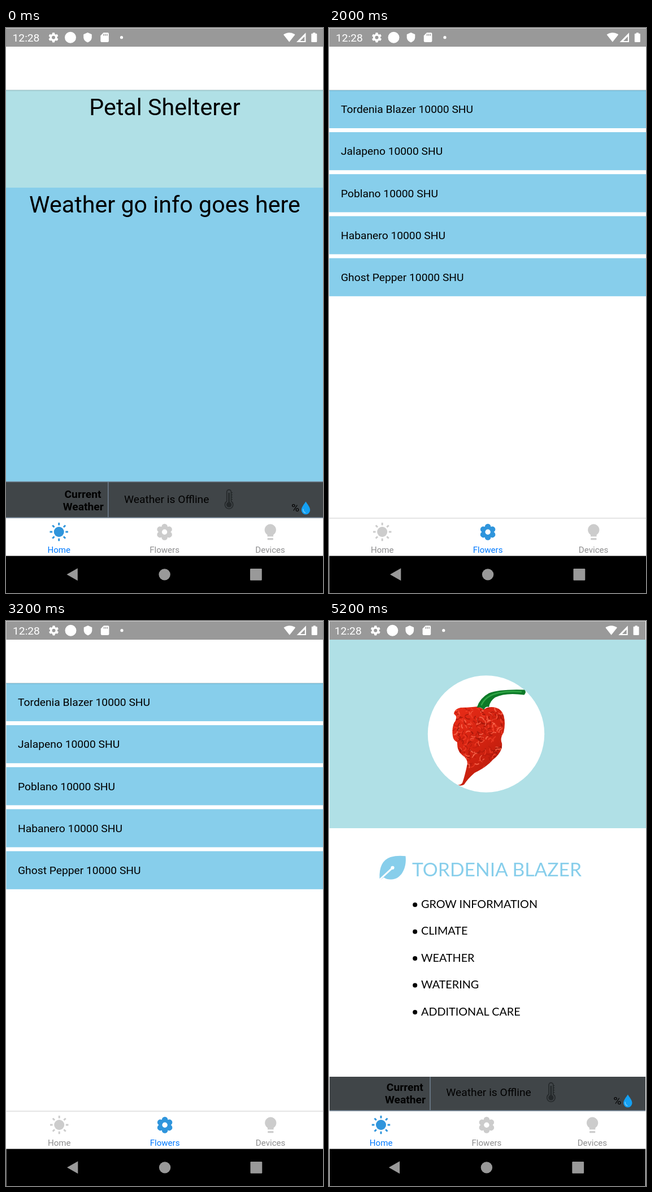
Recreate the animation shown at these times as an HTML page. Size 561x998 px, loop 6 s.

```html
<!DOCTYPE html>
<html lang="en">
<head>
<meta charset="utf-8">
<title>Garden app screens</title>
<style>
  html, body { margin: 0; width: 100%; height: 100%; overflow: hidden; background: #fff; }
  svg { display: block; width: 100vw; height: 100vh; }
  text { font-family: Roboto, sans-serif; white-space: pre; }
  .lato { font-family: Lato, sans-serif; }
</style>
</head>
<body>
<svg id="stage" viewBox="0 0 561 998" xmlns="http://www.w3.org/2000/svg"></svg>
<script>
const SKY = '#87ceeb', POWDER = '#b0e0e6', SLATE = '#708090', BAR = '#404548';
const ICON_ON = '#2f95dc', ICON_OFF = '#ccc', LABEL_ON = '#007aff', LABEL_OFF = '#8e8e8f';
const BODY = 19.25, TITLE = 41.2;

const rect = (x, y, w, h, fill, extra = '') =>
  `<rect x="${x}" y="${y}" width="${w}" height="${h}" fill="${fill}" ${extra}/>`;
const disc = (x, y, r, fill) => `<circle cx="${x}" cy="${y}" r="${r}" fill="${fill}"/>`;
const path = (d, fill, extra = '') => `<path d="${d}" fill="${fill}" ${extra}/>`;
const text = (x, y, size, str, fill = '#000', extra = '') =>
  `<text x="${x}" y="${y}" font-size="${size}" fill="${fill}" ${extra}>${str}</text>`;
const MID = 'text-anchor="middle"';
const shift = (dx, body) => `<g transform="translate(${dx} 0)">${body}</g>`;
const spin = (n, x, y, draw) => Array.from({ length: n }, (_, i) =>
  `<g transform="translate(${x} ${y}) rotate(${i * 360 / n})">${draw}</g>`).join('');

function statusIcons() {
  const w = '#fff';
  return text(11.5, 23.7, BODY, '12:28', w) +
    spin(6, 84, 16.8, rect(-2.2, -8.6, 4.4, 5, w, 'rx=".8"')) +
    `<circle cx="84" cy="16.8" r="4.8" fill="none" stroke="${w}" stroke-width="3.6"/>` +
    disc(114, 16.7, 10, w) +
    path('M144.5 8l7.3 3.2v5c0 4.3-3 7.8-7.3 9.2-4.3-1.4-7.3-4.9-7.3-9.2v-5z', w) +
    path('M172.500 8.300h7.600q1.800 0 1.800 1.800v13q0 1.800-1.800 1.800h-11q-1.800 0-1.800-1.800V13.400z', w) +
    [172.3, 175.2, 178.1].map(x => rect(x, 10.5, 1.5, 3.2, '#999')).join('') +
    disc(204.5, 16.7, 2.6, w) +
    path('M501.3 24.8L491 11.8Q495.5 8.2 501.3 8.2T511.6 11.8z', w) +
    path('M514 25L530.5 8.3V25zM520.5 22.9H528.3V15z', w, 'fill-rule="evenodd"') +
    path('M543.3 9.8V8.2h4V9.8h1.8q1.2 0 1.2 1.2V23.8q0 1.2-1.2 1.2h-7.6q-1.2 0-1.2-1.2V11q0-1.2 1.2-1.2z', w);
}

function sun(c) {
  return disc(93.7, 890, 9, c) + spin(8, 93.7, 890, rect(-1.5, -16.2, 3, 4.6, c));
}

function flower(c) {
  return spin(6, 280.6, 890.3, disc(0, -9.2, 5.3, c)) + disc(280.6, 890.3, 9.5, c) +
    disc(280.6, 890.3, 4.7, '#fff');
}

function bulb(c) {
  return path('M467.8 876.3a10.2 10.2 0 0 1 5.3 18.9V898.3h-10.6V895.2a10.2 10.2 0 0 1 5.3-18.9z', c) +
    rect(462.6, 901, 10.4, 3.2, c, 'rx="1.2"');
}

function tabs(active) {
  const items = [['Home', 93.8, sun], ['Flowers', 280.6, flower], ['Devices', 467.6, bulb]];
  return items.map(([name, x, icon], i) =>
    icon(i === active ? ICON_ON : ICON_OFF) +
    text(x, 927, 15.1, name, i === active ? LABEL_ON : LABEL_OFF, MID)).join('');
}

function navButtons() {
  const c = '#999';
  return path('M107.5 965.3L126.8 954.3V976.3z', c) + disc(280.6, 965.4, 10.2, c) +
    rect(432, 955, 20.8, 20.8, c, 'rx="1.2"');
}

function chrome(dx, left, right, active) {
  return rect(left, 0.5, right - left, 32.5, '#999') +
    rect(left, 932.5, right - left, 65.5, '#000') +
    shift(dx, statusIcons() + tabs(active) + navButtons());
}

function weatherBar(dx, left, right, top) {
  const thermo =
    path('M390.7 836V819.5a3.9 3.9 0 0 1 7.8 0V836a7.2 7.2 0 1 1-7.8 0z', 'none',
      'stroke="#24282a" stroke-width="1.6"') +
    rect(393.3, 821, 2.6, 20, '#24282a') + disc(394.6, 842, 4.7, '#24282a') +
    [820, 824, 828, 832].map(y => rect(398, y, 3, 1.3, '#24282a')).join('');
  const drop = path('M530.5 836.5C534 842 538.2 846.5 538.2 851.5a7.7 7.7 0 0 1-15.4 0C522.8 846.5 527 842 530.5 836.5z',
      '#14a0f2') +
    path('M526 850q-.5 4.5 3.5 6', 'none', 'stroke="#70c8fa" stroke-width="1.5" stroke-linecap="round"');
  return rect(left, top, right - left, 864 - top, BAR) +
    rect(left, 864, right - left, 1.8, SLATE) +
    shift(dx,
      rect(180, top, 1.5, 864 - top, SLATE) +
      text(136, 830, BODY, 'Current', '#000', MID + ' font-weight="700"') +
      text(136.7, 852, BODY, 'Weather', '#000', MID + ' font-weight="700"') +
      text(209, 839, BODY, 'Weather is Offline') + thermo +
      text(505, 853.5, BODY, '%') + drop);
}

const headerShade = rect(0, 109, 561, 3.5, 'url(#shade)');

function homeScreen() {
  return rect(0, 109.5, 561, 172.5, POWDER) + rect(0, 282, 561, 519, SKY) + headerShade +
    text(281, 153.5, TITLE, 'Petal Shelterer', '#000', MID) +
    text(281, 325.8, TITLE, 'Weather go info goes here', '#000', MID) +
    weatherBar(0, 0, 561, 802) + rect(0, 800.8, 561, 1.5, SLATE) +
    chrome(0, 0, 561, 0);
}

function listScreen() {
  const names = ['Tordenia Blazer', 'Jalapeno', 'Poblano', 'Habanero', 'Ghost Pepper'];
  return names.map((n, i) => {
    const y = 109.8 + i * 74.2;
    return rect(0.5, y, 560.5, 67.2, SKY) + text(21, y + 40.4, BODY, n + ' 10000 SHU');
  }).join('') + headerShade + rect(0.5, 865.2, 560.5, 1.3, '#d8d8d8') +
    chrome(0.5, 0.5, 561, 1);
}

function pepper() {
  let seed = 11;
  const rnd = () => (seed = seed * 16807 % 2147483647) / 2147483647;
  const tones = ['#9c1408', '#ff6f55', '#b81a0c', '#f5402a'];
  let folds = '';
  for (let i = 0; i < 260; i++) {
    const x = 217 + rnd() * 96, y = 152 + rnd() * 108, a = rnd() * 6.3, l = 2 + rnd() * 2.5;
    const dx = Math.cos(a) * l, dy = Math.sin(a) * l;
    folds += path(`M${x} ${y}q${dx - dy * .7} ${dy + dx * .7} ${dx * 2} ${dy * 2}`, 'none',
      `stroke="${tones[i % 4]}" stroke-width="${1 + rnd() * 1.4}" stroke-linecap="round" opacity=".75"`);
  }
  const skin = 'M263 151Q247 153 233 153Q222 155 221 164Q229 169 222 179Q217 188 219 203Q220 211 227 214' +
    'Q226 229 236 237Q245 243 245 252Q240 275 236 286Q233 290 228 289.5Q233 292 239 289' +
    'Q246 278 258 268Q279 258 290 245Q308 231 306 216Q302 207 309 197Q313 180 309 167' +
    'Q306 156 295 153Q284 150 274 156z';
  return `<clipPath id="skin"><path d="${skin}"/></clipPath>` + path(skin, 'url(#red)') +
    `<g clip-path="url(#skin)">${folds}</g>` +
    path('M261.5 153Q267 136 283 127.5Q302 120 346 121.5Q350 125 345.5 130.5Q312 126 294 135' +
      'Q285 141 283 152Q277 150 274 157Q269 151 261.5 153z', '#0d7a28') +
    path('M270 148Q277 132 300 127Q318 123.5 340 125', 'none',
      'stroke="#2fa645" stroke-width="2.5" stroke-linecap="round"');
}

function detailScreen() {
  const leaf = path('M135.5 415.3C138 436 128 456.5 110 456.5Q102 456.8 97 453Q93 456 91.5 457' +
      'L89.5 455Q88 424 109 417Q121 413.5 135.5 415.3z', SKY) +
    path('M89 457.5L112.5 435.8', 'none', 'stroke="#fff" stroke-width="3"') +
    disc(112.5, 435.8, 3.1, '#fff');
  const topics = ['GROW INFORMATION', 'CLIMATE', 'WEATHER', 'WATERING', 'ADDITIONAL CARE'];
  return rect(1, 33, 560, 333, POWDER) + disc(278, 199.5, 103.2, '#fff') + pepper() + leaf +
    text(147, 451, 33.7, 'TORDENIA BLAZER', SKY, 'class="lato"') +
    topics.map((t, i) => {
      const y = 507 + i * 47.45;
      return disc(152.2, y - 5.8, 4, '#000') + text(163, y, 19.8, t, '#000', 'class="lato"');
    }).join('') +
    weatherBar(-1.7, 1, 560, 805) + chrome(-1.7, 1, 560, 0);
}

const defs = `<defs>
  <linearGradient id="shade" x2="0" y2="1">
    <stop stop-opacity=".14"/><stop offset="1" stop-opacity="0"/>
  </linearGradient>
  <linearGradient id="red" x2=".7" y2="1">
    <stop stop-color="#ea2c18"/><stop offset=".6" stop-color="#d02210"/><stop offset="1" stop-color="#b81c0d"/>
  </linearGradient></defs>`;

const stage = document.getElementById('stage');
const HOLD = 2000;
stage.innerHTML = defs + [homeScreen, listScreen, detailScreen]
  .map(draw => `<g class="screen">${draw()}</g>`).join('');
const screens = [...stage.querySelectorAll('.screen')];

function show(ms) {
  const now = Math.floor(ms / HOLD) % screens.length;
  screens.forEach((s, i) => s.setAttribute('display', i === now ? 'inline' : 'none'));
}

const start = performance.now();
function tick() {
  show(performance.now() - start);
  requestAnimationFrame(tick);
}
tick();
</script>
</body>
</html>
```
